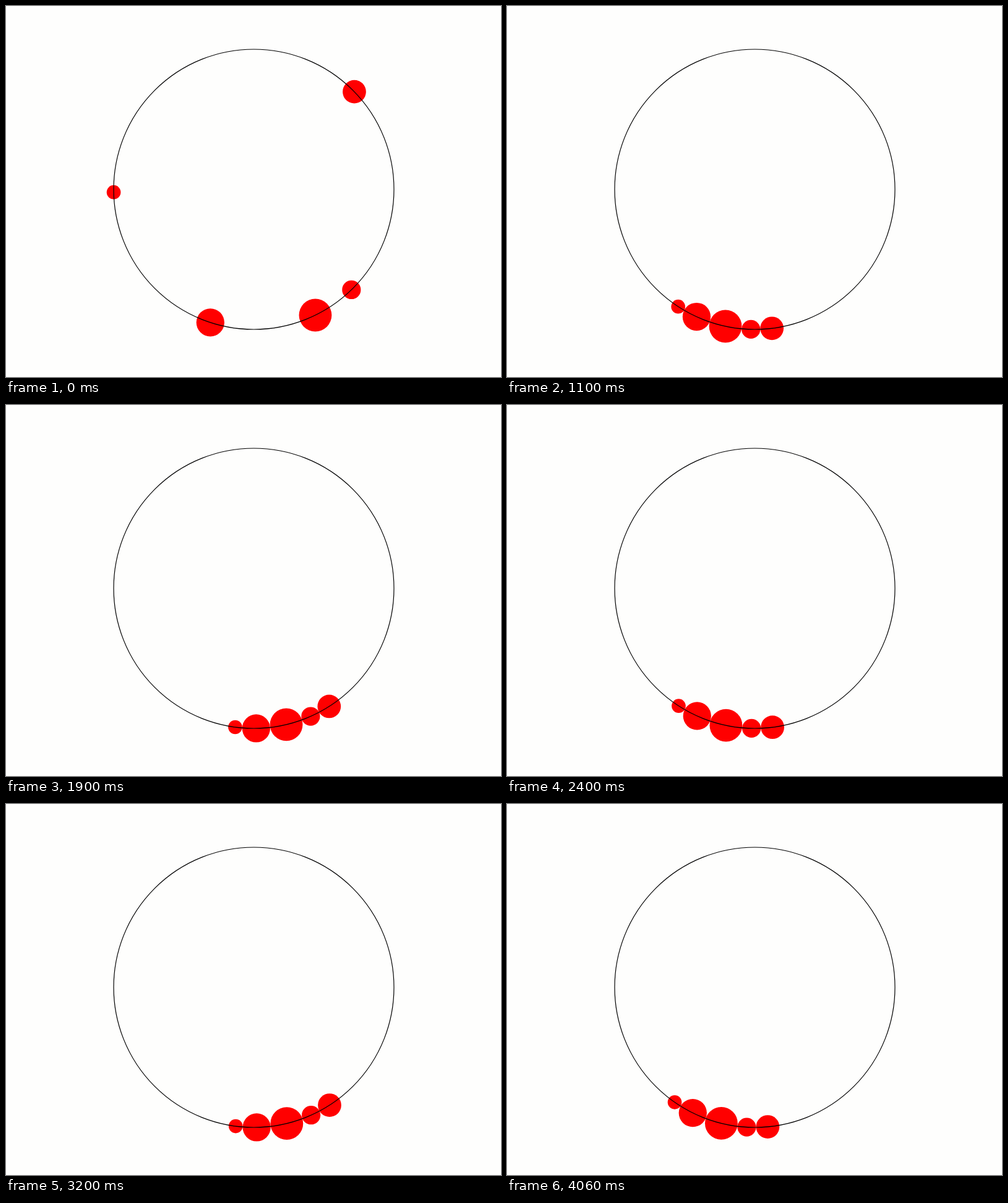
These frames come from a looping animation (800x600 px, 4100 ms). An HTML page with a canvas:

```html
<!DOCTYPE html>
<html lang="en">
<head>
<meta charset="utf-8">
<title>Beads on a ring</title>
<style>
  html, body { margin: 0; width: 100%; height: 100%; overflow: hidden; background: #fefefd; }
  canvas { display: block; }
</style>
</head>
<body>
<canvas id="stage" width="800" height="600"></canvas>
<script>
const ctx = document.getElementById("stage").getContext("2d");

const LOOP = 4100;
const FRAMES = 123;
const CX = 400.5, CY = 296.5, RING = 226.5;

// Metres and seconds; all beads weigh the same
const WIRE = 0.6;
const GRAVITY = 9.81;
const SCALE = RING / WIRE;
const STEPS = 200;
const H = 1 / 30 / STEPS;
const LEAD = STEPS * 1.5;

// Radius and starting direction (x right, y down) of each bead
const beads = [
  { r: 0.03, x: -1, y: 0 },
  { r: 0.06, x: -1, y: 3 },
  { r: 0.07, x: 1, y: 2 },
  { r: 0.04, x: 1, y: 1 },
  { r: 0.05, x: 1, y: -1 }
];

// Angle between neighbours that touch
const touch = (a, b) => 2 * Math.asin((a.r + b.r) / (2 * WIRE));

// A group is a run of touching beads; angles are measured from the bottom
let groups = beads.map(b => ({
  angle: Math.atan2(b.x, b.y), speed: 0, members: [b], offsets: [0]
}));

function move(g) {
  let pull = 0;
  for (const o of g.offsets) pull += Math.sin(g.angle + o);
  g.speed -= GRAVITY / WIRE * pull / g.offsets.length * H;
  g.angle += g.speed * H;
}

// Inelastic impact: the two groups go on as one
function merge(a, b, gap) {
  const n = a.members.length, m = b.members.length;
  const shift = a.offsets[n - 1] + gap;
  const overlap = a.angle + shift - b.angle;
  return {
    angle: a.angle - overlap * m / (n + m),
    speed: (a.speed * n + b.speed * m) / (n + m),
    members: a.members.concat(b.members),
    offsets: a.offsets.concat(b.offsets.map(o => o + shift))
  };
}

function step() {
  groups.forEach(move);
  for (let i = 0; i + 1 < groups.length;) {
    const a = groups[i], b = groups[i + 1];
    const gap = touch(a.members[a.members.length - 1], b.members[0]);
    const end = a.angle + a.offsets[a.offsets.length - 1];
    if (b.angle - end < gap) groups.splice(i, 2, merge(a, b, gap));
    else i++;
  }
}

function advance(count) {
  for (let i = 0; i < count; i++) step();
}

const poses = [];
advance(LEAD);
for (let n = 0; n < FRAMES; n++) {
  poses.push(groups.flatMap(g => g.offsets.map(o => g.angle + o)));
  advance(STEPS);
}

function disc(x, y, r) {
  ctx.beginPath();
  ctx.arc(x, y, r, 0, 2 * Math.PI);
}

function draw(pose) {
  ctx.fillStyle = "#fefefd";
  ctx.fillRect(0, 0, 800, 600);
  ctx.fillStyle = "#ff0000";
  pose.forEach((angle, i) => {
    disc(CX + RING * Math.sin(angle), CY + RING * Math.cos(angle), beads[i].r * SCALE);
    ctx.fill();
  });
  ctx.strokeStyle = "#000";
  ctx.lineWidth = 1.2;
  disc(CX, CY, RING);
  ctx.stroke();
}

// 30 pictures a second, each starting on a whole 10 ms
function poseAt(ms) {
  const tick = Math.floor(ms % LOOP / 10);
  return poses[Math.floor((tick * 3 + 2) / 10)];
}

const start = performance.now();
function loop() {
  draw(poseAt(performance.now() - start));
  requestAnimationFrame(loop);
}
loop();
</script>
</body>
</html>
```
